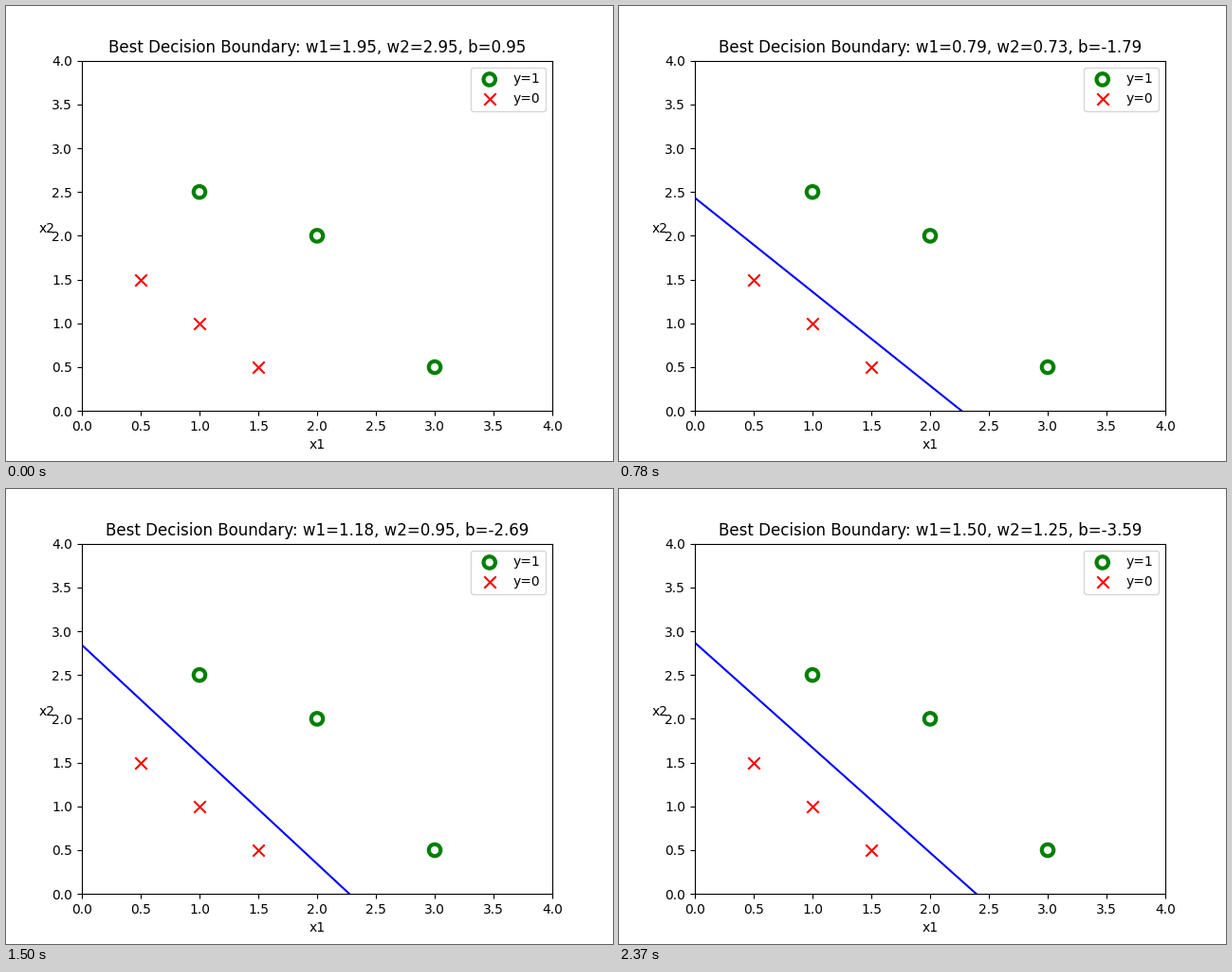
A matplotlib script for the animation above (5700 ms loop, 640x480 px).

```python
import numpy as np
import matplotlib.pyplot as plt
from matplotlib.animation import FuncAnimation

INTERVAL = 30
FRAMES = 190
TRAIN_FRAMES = 80
STEPS_PER_FRAME = 5
RATE = 0.1

X = np.array([[0.5, 1.5], [1, 1], [1.5, 0.5], [3, 0.5], [2, 2], [1, 2.5]])
y = np.array([0, 0, 0, 1, 1, 1])


def descend(w, b, steps):
    """Gradient descent for logistic regression; returns every (w1, w2, b)."""
    path = []
    for _ in range(steps):
        err = 1 / (1 + np.exp(-(X @ w + b))) - y
        w = w - RATE * (X.T @ err) / len(y)
        b = b - RATE * err.mean()
        path.append((w[0], w[1], b))
    return path


path = descend(np.array([2.0, 3.0]), 1.0, TRAIN_FRAMES * STEPS_PER_FRAME)
states = path[::STEPS_PER_FRAME]

plt.rcParams["font.family"] = "DejaVu Sans"
fig, ax = plt.subplots(figsize=(6.4, 4.8), dpi=100)
pos, neg = X[y == 1], X[y == 0]
ax.scatter(pos[:, 0], pos[:, 1], s=80, marker="o", facecolors="none",
           edgecolors="green", lw=3, label="y=1")
ax.scatter(neg[:, 0], neg[:, 1], s=80, marker="x", c="red", label="y=0")
ax.set_xlim(0, 4)
ax.set_ylim(0, 4)
ax.set_xlabel("x1")
ax.set_ylabel("x2", rotation=0)
ax.legend(loc="upper right")
line, = ax.plot([], [], color="blue", lw=1.5)
title = ax.set_title("")
xs = np.array([0.0, 4.0])


def update(i):
    w1, w2, b = states[min(i, TRAIN_FRAMES - 1)]
    line.set_data(xs, -(w1 * xs + b) / w2)
    title.set_text(f"Best Decision Boundary: w1={w1:.2f}, w2={w2:.2f}, b={b:.2f}")
    return line, title


anim = FuncAnimation(fig, update, frames=FRAMES, interval=INTERVAL,
                     init_func=lambda: update(0), repeat=True, repeat_delay=0)
plt.show()
```
